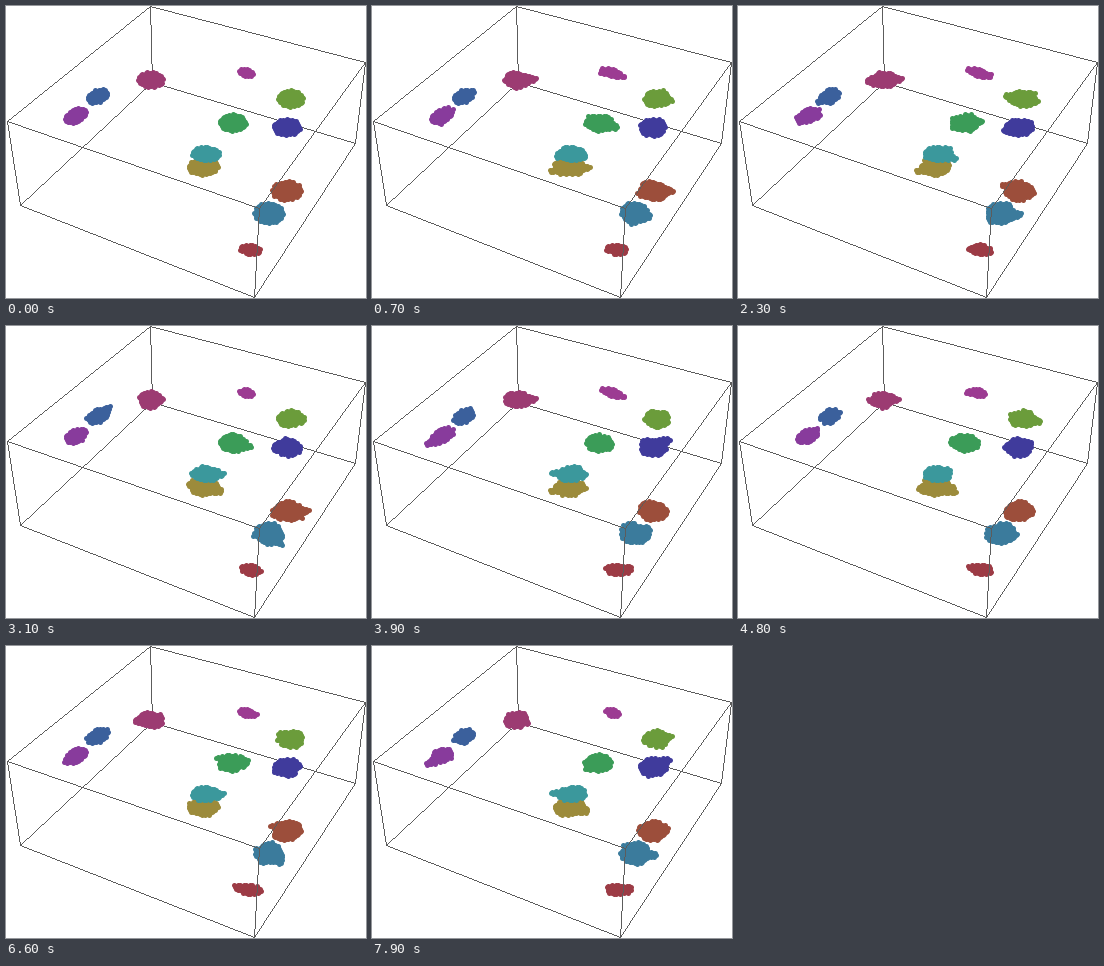
Write a matplotlib script that moves like this. It is 360 px wide and 292 px high and loops after 8 s.

```python
import colorsys
import numpy as np
import matplotlib.pyplot as plt
from matplotlib.animation import FuncAnimation

W, H, DPI = 360, 292, 100
FRAMES, STEP = 80, 100
DOT = 2.5      # radius of one voxel, px
ARMS = 4       # arms per cell
TAU = 2 * np.pi

rng = np.random.default_rng(7)

fig = plt.figure(figsize=(W / DPI, H / DPI), dpi=DPI, facecolor="white")
ax = fig.add_axes([0, 0, 1, 1])
ax.set(xlim=(0, W), ylim=(H, 0))
ax.axis("off")


def edge(a, b, zorder):
    """Hard one-pixel line."""
    n = max(abs(a[0] - b[0]), abs(a[1] - b[1])) + 1
    x, y = np.linspace(a, b, n).round().T + .5
    ax.plot(x, y, ",", color="#5c5c5c", zorder=zorder)


# Wire box; edges meeting at the near top corner lie in front of the cells
top = [(143, 0), (358, 56), (252, 202), (0, 115)]
bottom = [(145, 76), (348, 137), (247, 291), (13, 199)]
NEAR = 2
for i in range(4):
    j = (i + 1) % 4
    edge(top[i], top[j], 3 if NEAR in (i, j) else 1)
    edge(top[i], bottom[i], 3 if i == NEAR else 1)
    edge(bottom[i], bottom[j], 1)

# Voxel lattice, aligned with the box edges
i, j = np.mgrid[-20:21, -20:21]
LATTICE = np.stack([2.3 * i - 1.5 * j, .6 * i + 1.25 * j], -1).reshape(-1, 2)
LATTICE = LATTICE[np.abs(LATTICE).max(1) < 32]


class Cell:
    """A voxel blob with a restless outline and arms that grow and retract."""

    def __init__(self, hue, x, y, rx, ry, tilt=0):
        self.pos, self.ry = np.array([x, y]), ry
        slope = np.radians(tilt)
        c, s = np.cos(slope), np.sin(slope)
        px, py = LATTICE.T
        u = (px * c + py * s) / (rx - DOT + .7)
        v = (py * c - px * s) / (ry - DOT + .7)
        self.dist, self.angle = np.hypot(u, v), np.arctan2(v, u)
        self.phase = rng.uniform(0, TAU, 4)
        self.turns = rng.integers(3, 9, 4) * rng.choice([-1, 1], 4)
        self.jitter = rng.normal(0, .03, (FRAMES, len(LATTICE)))

        # Arms alternate left and right, each on its own rhythm
        aim = np.arange(ARMS) * np.pi + rng.normal(0, .35, ARMS)
        reach = rng.uniform(1.15, 1.5, ARMS) - DOT / rx
        ax_, ay_ = rx * reach * np.cos(aim), ry * reach * np.sin(aim)
        self.tips = np.stack([ax_ * c - ay_ * s, ax_ * s + ay_ * c], -1)
        self.beat = rng.integers(2, 6, ARMS)
        self.start = rng.uniform(0, TAU, ARMS)

        color = colorsys.hsv_to_rgb(hue / 360, .62, .61)
        self.dots = ax.scatter([], [], s=(2 * DOT * 72 / DPI) ** 2, color=color,
                               linewidths=0, antialiased=False, zorder=2)

    def body(self, t, f, grow):
        wave = sum(np.sin((k + 2) * self.angle + self.phase[k]
                          + TAU * self.turns[k] * t) for k in range(4))
        return self.dist <= 1 + grow * (.04 * wave + self.jitter[f])

    def arm(self, tip):
        along = np.clip(LATTICE @ tip / max(tip @ tip, 1e-6), 0, 1)
        gap = np.hypot(*(LATTICE - along[:, None] * tip).T)
        return gap <= .6 * self.ry * (1 - along) + 1.6

    def draw(self, f):
        t, grow = f / FRAMES, min(1, f / 6)
        keep = self.body(t, f, grow)
        length = grow * np.clip(np.sin(TAU * self.beat * t + self.start), 0, 1)
        for tip in self.tips * length[:, None]:
            keep = keep | self.arm(tip)
        self.dots.set_offsets(self.pos + LATTICE[keep])


# hue, centre, radii, tilt
cells = [
    Cell(326, 144.5, 73.5, 14.5, 9.5),
    Cell(306, 240, 66.5, 10.5, 4.5, 14),
    Cell(217, 91.5, 90, 12.5, 8.5, -22),
    Cell(288, 69.5, 109.5, 13.5, 8.5, -25),
    Cell(90, 284.5, 92.5, 15, 10),
    Cell(243, 280.5, 121, 15.5, 10.3),
    Cell(138, 226.5, 116.5, 15.5, 10),
    Cell(50, 197, 160.5, 17, 10.3),
    Cell(182, 199.5, 147.5, 15.8, 9),
    Cell(12, 280.5, 184.5, 16.5, 11.2),
    Cell(200, 262.5, 207, 16.5, 12),
    Cell(354, 244, 243.5, 12.5, 6.8, 8),
]


def draw(f):
    for cell in cells:
        cell.draw(f)
    return [cell.dots for cell in cells]


anim = FuncAnimation(fig, draw, frames=FRAMES, interval=STEP,
                     repeat=True, repeat_delay=0, blit=False)
plt.show()
```
